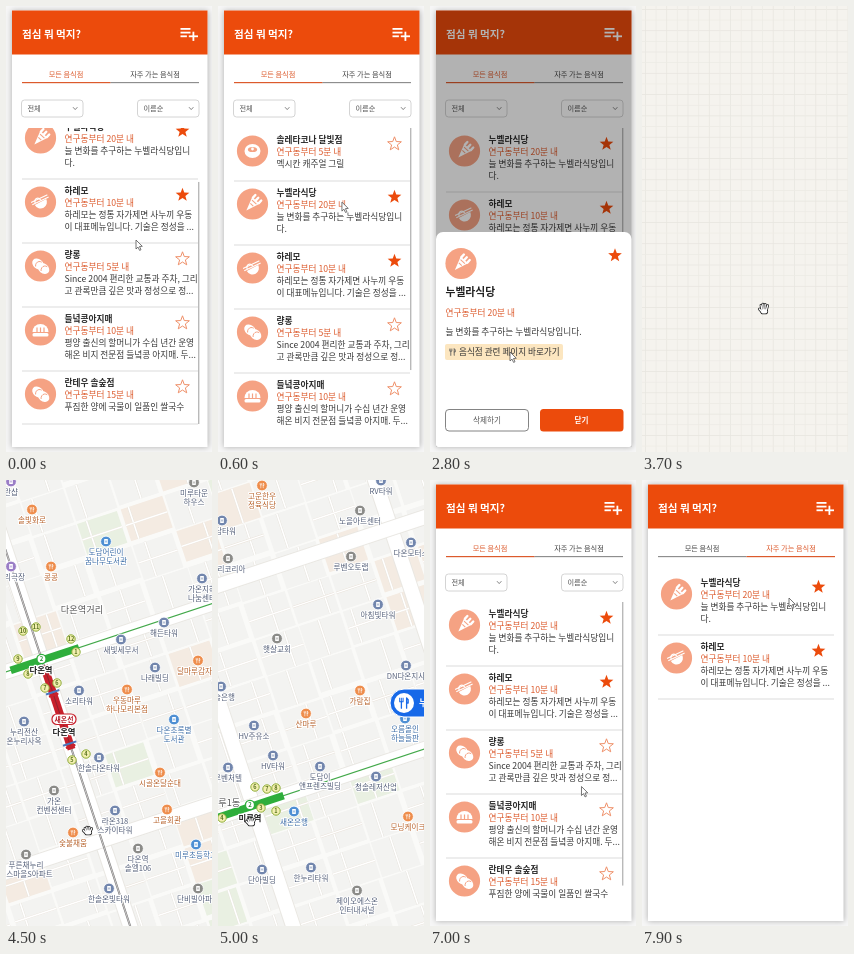
Animation of 206x446 px, one loop 8 s. Source, as an HTML page with a canvas:

```html
<!DOCTYPE html>
<html lang="ko">
<head>
<meta charset="utf-8">
<title>점심 뭐 먹지?</title>
<style>
  html, body { margin: 0; width: 100%; height: 100%; overflow: hidden; background: #f6f6f6; }
  canvas { display: block; width: 206px; height: 446px; }
</style>
</head>
<body>
<canvas id="stage"></canvas>
<script>
const W = 206, H = 446, LOOP = 8000, TICK = 100;
const FONT = '"Noto Sans CJK KR", "Noto Sans CJK", "Noto Sans", sans-serif';
const ORANGE = '#ec4b0c', PALE = '#f5a283', INK = '#2b2b2b';
const canvas = document.getElementById('stage');
const ctx = canvas.getContext('2d');
const dpr = window.devicePixelRatio || 1;
canvas.width = W * dpr;
canvas.height = H * dpr;

// ---------- helpers ----------
function text(s, x, y, size, color, { weight = 400, align = 'left', halo = 0 } = {}) {
  ctx.font = `${weight} ${size}px ${FONT}`;
  ctx.textAlign = align;
  const base = y + size * 0.38;
  if (halo) {
    ctx.lineWidth = halo;
    ctx.lineJoin = 'round';
    ctx.strokeStyle = '#fff';
    ctx.strokeText(s, x, base);
  }
  ctx.fillStyle = color;
  ctx.fillText(s, x, base);
}
function rect(x, y, w, h, color) {
  ctx.fillStyle = color;
  ctx.fillRect(x, y, w, h);
}
function box(x, y, w, h, r, fill, stroke, lw = 1) {
  ctx.beginPath();
  ctx.roundRect(x, y, w, h, r);
  if (fill) { ctx.fillStyle = fill; ctx.fill(); }
  if (stroke) { ctx.strokeStyle = stroke; ctx.lineWidth = lw; ctx.stroke(); }
}
function disc(x, y, r, fill, stroke, lw = 1) {
  box(x - r, y - r, 2 * r, 2 * r, r, fill, stroke, lw);
}
function line(points, color, lw, cap = 'butt') {
  ctx.beginPath();
  points.forEach(([x, y]) => ctx.lineTo(x, y));
  ctx.strokeStyle = color;
  ctx.lineWidth = lw;
  ctx.lineCap = cap;
  ctx.stroke();
}
function arc(x, y, r, a, b, color, lw) {
  ctx.beginPath();
  ctx.arc(x, y, r, a, b);
  ctx.strokeStyle = color;
  ctx.lineWidth = lw;
  ctx.lineCap = 'round';
  ctx.stroke();
}
function at(x, y, draw, angle = 0) {
  ctx.save();
  ctx.translate(x, y);
  ctx.rotate(angle);
  draw();
  ctx.restore();
}
function track(keys, t) {
  if (t <= keys[0][0]) return keys[0].slice(1);
  for (let i = 1; i < keys.length; i++) {
    const [t0, ...a] = keys[i - 1], [t1, ...b] = keys[i];
    if (t <= t1) {
      const p = (t - t0) / (t1 - t0), e = p * p * (3 - 2 * p);
      return a.map((v, k) => v + (b[k] - v) * e);
    }
  }
  return keys[keys.length - 1].slice(1);
}
function seeded(seed) {
  return () => (seed = (seed * 16807) % 2147483647) / 2147483647;
}

// ---------- list app ----------
const ITEMS = [
  { name: '솔레타코나 달빛점', min: 5, lines: ['멕시칸 캐주얼 그릴'], icon: 'dish' },
  { name: '누벨라식당', min: 20, fav: true, lines: ['늘 변화를 추구하는 누벨라식당입니', '다.'], icon: 'slice' },
  { name: '하레모', min: 10, fav: true, lines: ['하레모는 정통 자가제면 사누끼 우동', '이 대표메뉴입니다. 기술은 정성을 ...'], icon: 'noodle' },
  { name: '량롱', min: 5, lines: ['Since 2004 편리한 교통과 주차, 그리', '고 관록만큼 깊은 맛과 정성으로 정...'], icon: 'bun' },
  { name: '들녘콩아지매', min: 10, lines: ['평양 출신의 할머니가 수십 년간 운영', '해온 비지 전문점 들녘콩 아지매. 두...'], icon: 'bowl' },
  { name: '란테우 솔숲점', min: 15, lines: ['푸짐한 양에 국물이 일품인 쌀국수'], icon: 'bun' }
];
const itemHeight = it => (it.lines.length > 1 ? 64 : 53);
const distance = it => `연구동부터 ${it.min}분 내`;

const FOOD = {
  dish() {
    ctx.beginPath();
    ctx.ellipse(0, 0, 8, 7, 0, 0, 7);
    ctx.fillStyle = '#fff';
    ctx.fill();
    ctx.beginPath();
    ctx.ellipse(0, -1.5, 4.6, 2.6, 0, 0, 7);
    ctx.fillStyle = PALE;
    ctx.fill();
    disc(0, -2, 1.4, '#fff');
  },
  slice() {
    ctx.rotate(0.75);
    ctx.beginPath();
    ctx.moveTo(-5, -5);
    ctx.lineTo(5, -5);
    ctx.lineTo(0, 9);
    ctx.fillStyle = '#fff';
    ctx.fill();
    for (const x of [-4, 0, 4]) line([[x, -8.5], [x, -5]], '#fff', 2.4, 'round');
    line([[-3, -2.5], [3, -2.5]], PALE, 1);
    line([[-2, 1], [2, 1]], PALE, 1);
  },
  noodle() {
    ctx.rotate(-0.5);
    ctx.beginPath();
    ctx.arc(0, 0, 6.5, 0, Math.PI);
    ctx.fillStyle = '#fff';
    ctx.fill();
    for (const y of [-1.5, -4]) line([[-8, y], [9, y + 1]], '#fff', 1.2, 'round');
    arc(-2, -2, 3, Math.PI, 0, '#fff', 1.2);
  },
  bun() {
    for (const [x, y] of [[-2.5, -2], [3, 2.5]]) {
      ctx.beginPath();
      ctx.ellipse(x, y, 6.4, 4.8, 0.7, 0, 7);
      ctx.fillStyle = '#fff';
      ctx.fill();
      arc(x + 1.5, y + 1.5, 4, 3, 5.2, PALE, 1);
    }
  },
  bowl() {
    ctx.beginPath();
    ctx.arc(0, 2, 8, Math.PI, 0);
    ctx.fillStyle = '#fff';
    ctx.fill();
    box(-8, 3, 16, 3.5, 1.5, '#fff');
    for (const x of [-3.5, 0, 3.5]) line([[x, -2.5], [x, 2]], PALE, 1.2);
  }
};
function badge(icon, x, y) {
  disc(x, y, 15.6, PALE);
  at(x, y, FOOD[icon]);
}
function star(x, y, r, on) {
  ctx.beginPath();
  for (let i = 0; i < 10; i++) {
    const a = -Math.PI / 2 + i * Math.PI / 5, q = i % 2 ? r * 0.42 : r;
    ctx.lineTo(x + q * Math.cos(a), y + q * Math.sin(a));
  }
  ctx.closePath();
  if (on) {
    ctx.fillStyle = ORANGE;
    ctx.fill();
  } else {
    ctx.strokeStyle = '#ef9069';
    ctx.lineWidth = 1;
    ctx.stroke();
  }
}
function cutlery(x, y, s, color) {
  at(x, y, () => {
    ctx.scale(s, s);
    line([[-2, -1], [-2, 4]], color, 1, 'round');
    line([[-3.3, -4], [-3.3, -1], [-0.7, -1], [-0.7, -4]], color, 0.8);
    line([[-2, -4], [-2, -1]], color, 0.7);
    line([[2, 4], [2, -4], [3.2, -2.5], [3.2, 0], [2, 0]], color, 1, 'round');
  });
}
function select(x, label) {
  box(x, 94, 61.5, 17, 3, '#fff', '#c9c9c9', 0.8);
  text(label, x + 6, 102.5, 7.2, '#555');
  line([[x + 51.5, 101.2], [x + 53.7, 103.6], [x + 55.9, 101.2]], '#777', 0.9);
}
function list(items, top, bottom, scroll) {
  ctx.save();
  ctx.beginPath();
  ctx.rect(6, top, 196, bottom - top + 1);
  ctx.clip();
  let y = top - scroll;
  for (const it of items) {
    badge(it.icon, 34.5, y + 23);
    text(it.name, 58.5, y + 12, 8.7, INK, { weight: 700 });
    text(distance(it), 58.5, y + 24, 8.7, '#dc5a2c');
    it.lines.forEach((s, i) => text(s, 58.5, y + 36 + 12 * i, 8.7, '#3a3a3a'));
    star(176.5, y + 16, 7.2, it.fav);
    y += itemHeight(it);
    rect(16, y - 0.5, 176, 1, '#dcdcdc');
  }
  ctx.restore();
  const view = bottom - top, total = y + scroll - top;
  if (total > view) rect(192, top + scroll * view / total, 1.4, view * view / total, '#b9b9b9');
}
function header() {
  rect(6, 4.5, 195.5, 44, ORANGE);
  text('점심 뭐 먹지?', 16, 27.5, 10.6, '#fff', { weight: 700 });
  rect(174.5, 22, 10, 1.8, '#fff');
  rect(174.5, 25.7, 10, 1.8, '#fff');
  rect(174.5, 29.4, 6.4, 1.8, '#fff');
  rect(182.8, 29.4, 9.2, 1.8, '#fff');
  rect(186.5, 25.7, 1.8, 9.2, '#fff');
}
function tabs(active) {
  ['모든 음식점', '자주 가는 음식점'].forEach((s, i) => {
    const on = i === active;
    text(s, 60 + 89 * i, 68.5, 7.2, on ? '#dc5a2c' : '#444', { align: 'center' });
    rect(16 + 88.5 * i, on ? 76 : 76.4, 88.5, on ? 1.2 : 0.7, on ? '#dc5a2c' : '#444');
  });
}
function sheet(it) {
  rect(6, 4.5, 195.5, 436.5, 'rgba(0,0,0,.3)');
  box(6, 226, 195.5, 215, [7, 7, 2, 2], '#fff');
  badge(it.icon, 31, 257.5);
  star(185, 249.5, 7.2, it.fav);
  text(it.name, 15.5, 286, 10.8, '#222', { weight: 700 });
  text(distance(it), 15.5, 306.5, 8.7, '#dc5a2c');
  text(it.lines.join(''), 15.5, 325.5, 8.7, '#3a3a3a');
  box(15, 338, 118, 16, 2, '#fce6c0');
  cutlery(22.5, 346, 0.85, '#555');
  text('음식점 관련 페이지 바로가기', 29, 346, 8.6, '#333');
  box(15.5, 403.5, 83, 21.5, 3.5, '#fff', '#777', 0.9);
  text('삭제하기', 57, 414, 7.6, '#555', { align: 'center' });
  box(110, 403, 83.5, 22.5, 3.5, ORANGE);
  text('닫기', 151.5, 414, 7.6, '#fff', { align: 'center', weight: 700 });
}
function app(t) {
  rect(0, 0, W, H, '#f6f6f6');
  ctx.save();
  ctx.shadowColor = 'rgba(0,0,0,.3)';
  ctx.shadowBlur = 6 * dpr;
  rect(6, 4.5, 195.5, 436.5, '#fff');
  ctx.restore();
  header();

  ITEMS[0].fav = t >= 1200;
  const items = t < 2000 ? ITEMS : ITEMS.slice(1);
  const favTab = t >= 7200;
  tabs(favTab ? 1 : 0);
  if (favTab) {
    list(items.filter(it => it.fav), 91, 418, 0);
  } else {
    select(15.5, '전체');
    select(131.5, '이름순');
    list(items, 122, 418, track([[100, 66], [600, 0]], t)[0]);
  }
  if (t >= 900 && t < 2000) sheet(ITEMS[0]);
  if (t >= 2400 && t < 6800) sheet(ITEMS[1]);
}

// ---------- map ----------
const TILT = -0.32;
const TINT = { b: '#7286ad', f: '#ee8d4c', l: '#4e8fd3', g: '#8b8b88', p: '#9a7dc6' };
const SOUTH = [
  ['란샵', 5, 12, 'p'], ['솔빛화로', 26, 40, 'f'], ['도담어린이/꿈나무도서관', 100, 72, 'l'],
  ['미루타운/하우스', 188, 13, 'g'], ['콩콩', 45, 97, 'f'], ['누리극장', 5, 97, 'p'],
  ['가온지혜/나눔센터', 196, 109, 'b'], ['새빛세무서', 115, 170, 'b'], ['해든타워', 158, 153, 'b'],
  ['나래빌딩', 149, 198, 'b'], ['달마루감자탕', 192, 191, 'f'], ['우동마루/하나모리본점', 121, 220, 'f'],
  ['다온초록별/도서관', 168, 250, 'l'], ['누리전산/온누리사옥', 18, 252, 'b'], ['소리타워', 73, 221, 'b'],
  ['한솔다온타워', 93, 288, 'b'], ['시골온달순대', 154, 303, 'f'], ['고을회관', 161, 340, 'f'],
  ['가온/컨벤션센터', 48, 321, 'g'], ['라온318/스카이타워', 109, 341, 'b'], ['숯불채움', 67, 363, 'f'],
  ['다온역/솔엘106', 132, 379, 'g'], ['미루초등학교', 190, 375, 'l'], ['푸른채누리/에스마을S아파트', 20, 385, 'g'],
  ['한솔온빛타워', 103, 419, 'b'], ['단비빌아파트', 192, 419, 'g']
];
const NORTH = [
  ['고운한우/정육식당', 44, 16, 'f'], ['RV타워', 163, 11, 'b'], ['노을아트센터', 142, 41, 'g'],
  ['다온모터스', 193, 73, 'b'], ['별담타워', 4, 51, 'b'], ['루벤오토랩', 133, 87, 'g'],
  ['포리코리아', 10, 89, 'g'], ['아침빛타워', 160, 135, 'b'], ['햇살교회', 59, 169, 'g'],
  ['DN다온지사', 188, 196, 'b'], ['가람집', 142, 221, 'f'], ['늘솔은행', 3, 217, 'b'],
  ['산마루', 88, 244, 'f'], ['HV주유소', 36, 256, 'b'], ['오름몰인/하늘들판', 187, 249, 'l'],
  ['HV타워', 55, 286, 'b'], ['도담이/앤프렌즈빌딩', 102, 297, 'b'], ['청솔레저산업', 158, 307, 'b'],
  ['루벤처텔', 10, 298, 'b'], ['새온은행', 76, 342, 'l'], ['모닝케이크', 190, 347, 'f'],
  ['단아빌딩', 44, 400, 'b'], ['한누리타워', 93, 398, 'b'], ['제이오에스온/인터내셔널', 139, 421, 'g'],
  ['새벽빌딩', 238, 120, 'b'], ['온달분식', 246, 300, 'f']
];
function place([name, x, y, kind]) {
  const color = TINT[kind];
  disc(x, y - 10.5, 5.4, color, '#fff', 0.9);
  if (kind === 'f') cutlery(x, y - 10.5, 0.6, '#fff');
  else {
    rect(x - 1.8, y - 13, 3.6, 5, '#fff');
    rect(x - 0.5, y - 11.5, 1, 2, color);
  }
  const ink = kind === 'f' ? '#b8652f' : kind === 'l' ? '#3f6fa8' : '#56617a';
  name.split('/').forEach((s, i) => text(s, x, y + 8.7 * i, 7.6, ink, { align: 'center', weight: 500, halo: 2 }));
}
function exits(points) {
  points.forEach(([x, y, n]) => {
    disc(x, y, 4.2, '#f3efb0', '#8fae3a', 1);
    text(n, x, y, 5.6, '#55701c', { align: 'center', weight: 700 });
  });
}
function streets() {
  const rnd = seeded(77);
  for (let u = -200; u < 620; u += 46) {
    for (let v = -460; v < 480; v += 38) {
      const w = 40 + rnd() * 5, h = 32 + rnd() * 5, c = rnd();
      rect(u, v, w, h, c < 0.1 ? '#f4ebe2' : c < 0.16 ? '#e9f0e2' : '#f3f3f1');
      const m = 8 + rnd() * (w - 16);
      line([[u + m, v], [u + m, v + h]], '#e6e2db', 2.4);
      line([[u + m, v], [u + m, v + h]], '#fff', 1.6);
      if (rnd() < 0.6) {
        line([[u, v + h / 2], [u + w, v + h / 2]], '#e9e2d9', 2.2);
        line([[u, v + h / 2], [u + w, v + h / 2]], '#fff', 1.5);
      }
    }
  }
  for (const u of [0, 252, 470]) {
    rect(u - 8, -500, 16, 1000, '#e9e7e2');
    rect(u - 7, -500, 14, 1000, '#fff');
  }
  for (const v of [-220, 0, 190]) {
    rect(-250, v - 8, 900, 16, '#e9e7e2');
    rect(-250, v - 7, 900, 14, '#fff');
  }
}
function rails() {
  line([[0, -500], [0, 500]], '#777', 2);
  line([[0, -500], [0, 500]], '#d8d4d4', 0.8);
  line([[-250, 0], [650, 0]], '#43a94a', 1.2);
  line([[-33, 0], [39, 0]], '#2fae3c', 7.5);
  line([[215, 0], [284, 0]], '#2fae3c', 7.5);
  line([[0, 6], [0, 94]], '#c8202c', 8);
  line([[0, 8], [0, 92]], '#8d2530', 1);
  for (const v of [34, 88]) {
    line([[-7, v], [7, v]], '#4a78c0', 2);
    line([[-5, v + 3], [5, v + 3]], '#c8202c', 2);
  }
}
function station(name, x, y) {
  text(name, x, y, 8.4, '#222', { align: 'center', weight: 700, halo: 2.4 });
}
function map(t) {
  const [ox, oy] = track([[3800, 40, -47], [4500, 0, 0], [4600, 0, 0], [5000, -240, 225],
    [5200, -240, 225], [5500, -300, 252]], t);
  rect(0, 0, W, H, '#fafaf8');
  at(ox, oy, () => {
    at(36, 180, () => { streets(); rails(); }, TILT);
    SOUTH.forEach(place);
    text('다온역거리', 76, 130, 9.2, '#555', { align: 'center', weight: 500, halo: 2 });
    exits([[17, 151, 10], [30, 147, 11], [65, 159, 12], [70, 172, 1], [12, 179, 9],
      [22, 194, 8], [39, 208, 7], [51, 203, 6], [66, 280, 5], [80, 274, 4]]);
    disc(35.5, 179, 4.6, '#fff', '#2fae3c', 1.4);
    text('2', 35.5, 179, 6, '#2a8f35', { align: 'center', weight: 700 });
    station('다온역', 35, 190);
    box(46, 234, 24, 10.5, 5, '#fff', '#c8202c', 1.2);
    text('새온선', 58, 239.2, 6.8, '#b51c28', { align: 'center', weight: 700 });
    station('다온역', 58, 252);
    at(240, -225, () => {
      NORTH.forEach(place);
      text('미루1동', 7, 323, 9.2, '#555', { align: 'center', weight: 500, halo: 2 });
      exits([[37, 307, 6], [49, 309, 7], [58, 308, 8], [43, 328, 3], [58, 331, 1], [4, 338, 4]]);
      disc(32, 325, 4.6, '#fff', '#2fae3c', 1.4);
      text('2', 32, 325, 6, '#2a8f35', { align: 'center', weight: 700 });
      station('미루역', 32, 338);
      box(172, 209, 80, 28, 14, '#1769e8', '#fff', 1);
      disc(186, 223, 10, '#fff');
      cutlery(186, 223, 1.3, '#1769e8');
      text('누벨라식당', 201, 223, 9, '#fff', { weight: 700 });
    });
  });
}
function blank() {
  rect(0, 0, W, H, '#f5f3ee');
  const step = 10.65;
  for (let i = 0; i * step < H; i++) {
    const c = i % 2 ? '#edebe5' : '#e8e6e0', p = 3 + i * step;
    rect(0, p, W, 0.8, c);
    if (p < W) rect(p, 0, 0.8, H, c);
  }
}

// ---------- cursors ----------
const ARROW = [[0, 0], [0, 9], [2, 7.1], [3.6, 10.4], [5, 9.7], [3.5, 6.5], [6.3, 6.3]];
function arrow(x, y) {
  at(x, y, () => {
    ctx.beginPath();
    ARROW.forEach(p => ctx.lineTo(...p));
    ctx.closePath();
    ctx.fillStyle = '#fff';
    ctx.fill();
    ctx.strokeStyle = '#555';
    ctx.lineWidth = 0.8;
    ctx.lineJoin = 'round';
    ctx.stroke();
  });
}
function hand(x, y, closed) {
  const up = closed ? 2 : 0;
  at(x, y, () => {
    for (const [color, grow] of [['#222', 1.5], ['#fff', 0]]) {
      for (const [a, b, h] of [[-3, -2, -3.6], [-1.2, -0.7, -4.9], [1.2, 0.9, -4.7], [3.6, 2.4, -3.4]]) {
        line([[a, h + up], [b, 1]], color, 1.3 + grow, 'round');
      }
      line([[-4.6, up * 0.3], [-1.5, 3.5]], color, 1.4 + grow, 'round');
      line([[-0.8, 2.4], [1.2, 2.4]], color, 4.2 + grow, 'round');
    }
  });
}
const POINTER = [[0, 130, 234], [200, 130, 234], [500, 126, 214], [800, 118, 145], [900, 120, 148],
  [1000, 132, 175], [1200, 184, 250], [1300, 172, 278], [1500, 91, 379], [1900, 70, 413], [2000, 74, 404],
  [2300, 112, 148], [2400, 110, 152], [2700, 82, 345], [2800, 80, 346]];
const RETURN = [[6000, 60, 20], [6600, 150, 413], [6700, 150, 413], [6900, 152, 390], [7200, 150, 68],
  [7300, 154, 78], [7600, 171, 157], [7700, 158, 132], [7800, 150, 111], [7900, 147, 118]];
const PAN = [[2900, 82, 344], [3700, 122, 303], [3800, 122, 303], [4500, 82, 350], [4600, 165, 215],
  [5000, 33, 341], [5200, 200, 335], [5500, 140, 362], [5600, 33, 24]];
const between = (t, a, b) => t >= a && t <= b;

function draw(t) {
  ctx.setTransform(dpr, 0, 0, dpr, 0, 0);
  if (t < 2900 || t >= 5900) {
    app(t);
    if (t < 2900) arrow(...track(POINTER, t));
    else if (t >= 6000) arrow(...track(RETURN, t));
    return;
  }
  if (t < 3800) blank();
  else map(t);
  const dragging = between(t, 3800, 4500) || between(t, 4700, 5000) || between(t, 5200, 5500);
  if (t < 5700) hand(...track(PAN, t), dragging);
}

const start = performance.now();
let last = -1;
function frame() {
  const t = Math.floor(((performance.now() - start) % LOOP) / TICK) * TICK;
  if (t !== last) draw(last = t);
  requestAnimationFrame(frame);
}
frame();
</script>
</body>
</html>
```
